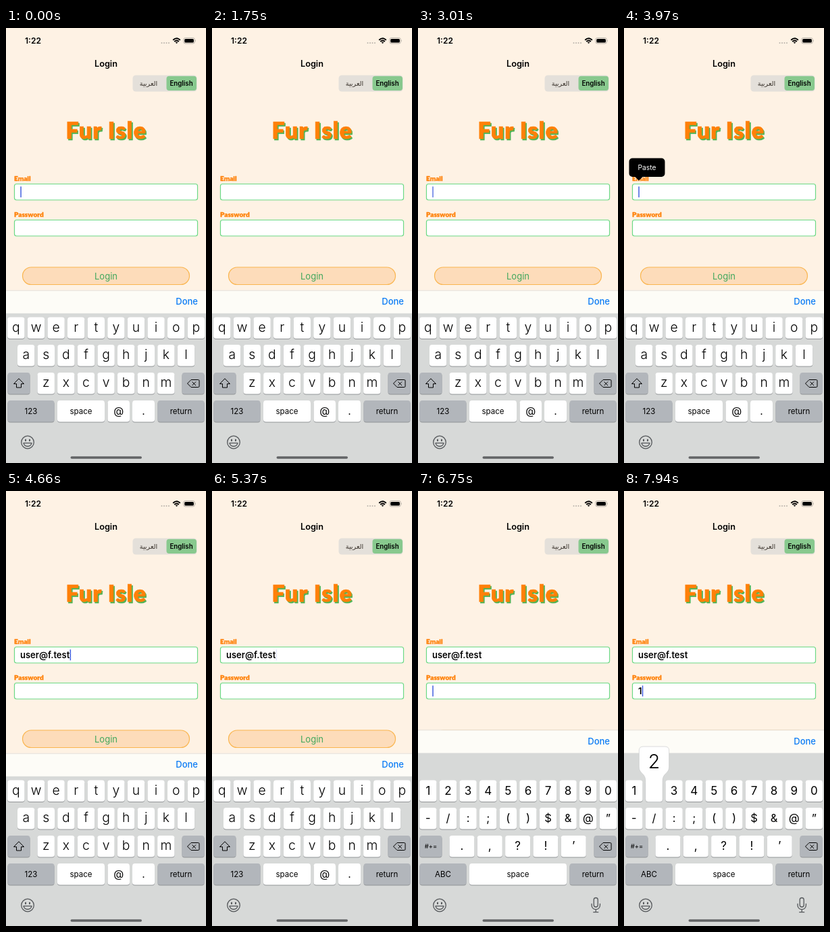
Recreate the animation shown at these times as an HTML page. Size 296 by 640 pixels, loop 8 s.

```html
<!DOCTYPE html>
<html lang="en">
<head>
<meta charset="utf-8">
<title>Login</title>
<style>
html, body { margin: 0; width: 100%; height: 100%; overflow: hidden; background: #fef2e4; }
svg { display: block; width: 100%; height: 100%; font-family: Inter, Roboto, sans-serif; }
.brand { font-family: Lato, "Open Sans", sans-serif; font-weight: 900; }
.mid { text-anchor: middle; }
</style>
</head>
<body>
<svg viewBox="0 0 296 640">
  <rect width="296" height="640" fill="#fef2e4"/>

  <text x="28" y="23" font-size="12" font-weight="600">1:22</text>
  <g fill="#b9b3ac">
    <circle cx="230.5" cy="22" r="1"/><circle cx="234" cy="22" r="1"/>
    <circle cx="237.5" cy="22" r="1"/><circle cx="241" cy="22" r="1"/>
  </g>
  <g fill="none" stroke="#000" stroke-width="1.9">
    <path d="M247.2 17.7Q252.5 12.7 257.8 17.7M249.2 20Q252.5 16.9 255.8 20"/>
    <path d="M250.7 21.2Q252.5 19.7 254.3 21.2L252.5 23Z" fill="#000" stroke="none"/>
  </g>
  <rect x="262.8" y="14.5" width="16.5" height="8.4" rx="2.6" fill="none" stroke="#a8a29b" stroke-width=".8"/>
  <rect x="264.2" y="15.9" width="13.7" height="5.6" rx="1.5"/>
  <path d="M280.3 17.2q1.3 1.5 0 3z" fill="#a8a29b"/>

  <text class="mid" x="148" y="57" font-size="12.7" font-weight="600">Login</text>
  <rect x="187.5" y="69.5" width="95" height="24" rx="4.5" fill="#e4e0da"/>
  <rect x="237.5" y="70.7" width="44.5" height="21.3" rx="4" fill="#88c98e"/>
  <text class="mid" x="211" y="84.5" font-size="9.7" fill="#3a332c" style="font-family:'DejaVu Sans',sans-serif">العربية</text>
  <text class="mid" x="259.5" y="85" font-size="9.7" font-weight="600">English</text>

  <g class="brand mid" font-size="34" letter-spacing="1.2" stroke-width=".7">
    <text x="150" y="164.5" fill="#4fb455" stroke="#4fb455">Fur Isle</text>
    <text x="148.3" y="163.3" fill="#ff8008" stroke="#ff8008">Fur Isle</text>
  </g>
  <g class="brand" font-size="10" fill="#ff8008" stroke="#ff8008" stroke-width=".3">
    <text x="12" y="225">Email</text>
    <text x="12" y="278">Password</text>
  </g>
  <g fill="#fff" stroke="#6bd985" stroke-width="1.2">
    <rect x="12.5" y="229.5" width="271" height="23.5" rx="3"/>
    <rect x="12.5" y="282.5" width="271" height="23.5" rx="3"/>
  </g>
  <g font-size="13" font-weight="600">
    <text id="email" x="21" y="245.5">user@f.test</text>
    <text id="pass" x="21" y="298.5">1</text>
  </g>
  <rect id="caret" width="1.5" height="16" fill="#4361e0"/>

  <rect x="24.5" y="352" width="247" height="25.5" rx="12.7" fill="#fddcba" stroke="#fab650" stroke-width="1.2"/>
  <text class="mid" x="148" y="369.5" font-size="13" fill="#3fa75c">Login</text>

  <g id="menu">
    <path d="M12.5 191.5h43a5 5 0 0 1 5 5v17.5a5 5 0 0 1-5 5h-28l-5.5 5.500-5.500-5.500h-4a5 5 0 0 1-5-5v-17.500a5 5 0 0 1 5-5z"/>
    <text class="mid" x="34" y="209" font-size="10.3" fill="#fff">Paste</text>
  </g>

  <g id="bar">
    <rect width="296" height="34.5" fill="#fdfcf7"/>
    <rect width="296" height=".7" fill="#d9d3cb"/>
    <text x="284" y="21.7" text-anchor="end" font-size="13" font-weight="500" fill="#0a7bf5">Done</text>
  </g>
  <rect id="tray" width="296" height="260" fill="#d7d9d8"/>
  <g id="mailKeys"></g>
  <g id="passKeys"></g>
  <g id="numKeys"></g>

  <g fill="none" stroke="#55585b" stroke-width="1.3" stroke-linecap="round" stroke-linejoin="round">
    <circle cx="32" cy="609.5" r="9.3"/>
    <path d="M26 610.7h12q-1.200 4.800-6 4.800t-6-4.800z"/>
    <path d="M29 605.8v1.500M35 605.800v1.500" stroke-width="2"/>
    <g id="mic">
      <rect x="260.2" y="598.5" width="6" height="13.5" rx="3"/>
      <path d="M257 607.5v2a6.200 6.200 0 0 0 12.400 0v-2M263.200 616v3.500M259.700 619.700h7"/>
    </g>
  </g>
  <rect x="95.5" y="630.3" width="105.5" height="3.4" rx="1.7" fill="#626466"/>
  <g id="popup">
    <path id="bulb" fill="#fff" stroke="#c3c5c6" stroke-width=".6"/>
    <text id="digit" class="mid" y="408" font-size="28.5" font-weight="300"></text>
  </g>
</svg>
<script>
const $ = id => document.getElementById(id);
const LOOP = 8000, PITCH = 29.6, KEY_H = 31.5;
const ROWS = [425.5, 466, 507, 548];

function key(x, row, w, label, size, { grey = false, weight = 400, lift = 0 } = {}) {
  const y = ROWS[row];
  const box = (dy, fill) =>
    `<rect x="${x}" y="${y + dy}" width="${w}" height="${KEY_H}" rx="3.8" fill="${fill}"/>`;
  const text = label.replace("&", "&amp;");
  return box(1, "#929597") + box(0, grey ? "#b2b6bb" : "#fff") +
    `<text class="mid" x="${x + w / 2}" y="${y + 15.5 + size * .35 - lift}" font-size="${size}" font-weight="${weight}">${text}</text>`;
}

const run = (chars, x, row, size, { w = 25.4, pitch = PITCH, ...look } = {}) =>
  [...chars].map((c, i) => key(x + i * pitch, row, w, c, size, look)).join("");

const GREY = { grey: true };

const eraser = () => key(260.5, 2, 33, "", 10, GREY) +
  `<path d="M274 517.5h10.5q1.5 0 1.5 1.5v8q0 1.5-1.5 1.5h-10.5l-5.500-5.500zM275.500 520.500l5.500 5.500m0-5.500l-5.500 5.500"
    fill="none" stroke="#000" stroke-width="1" stroke-linejoin="round"/>`;

const shift = () => key(2.5, 2, 33, "", 10, GREY) +
  `<path d="M19 515.8l7.5 7.700h-4v5.500h-7v-5.500h-4z"
    fill="none" stroke="#000" stroke-width="1" stroke-linejoin="round"/>`;

const LETTER = { weight: 300, lift: 1.2 };
const letters = () => run("qwertyuiop", 2.2, 0, 19.3, LETTER) + run("asdfghjkl", 17, 1, 19.3, LETTER) +
  shift() + run("zxcvbnm", 46.5, 2, 19.3, LETTER) + eraser();

const ends = mode => key(2.5, 3, 69, mode, 11.5, { grey: true, lift: -.8 }) +
  key(224.5, 3, 69, "return", 11.5, GREY);
const wideSpace = () => key(76, 3, 144, "space", 11.5);

$("mailKeys").innerHTML = letters() + ends("123") + key(76, 3, 70, "space", 11.5) +
  key(150.5, 3, 32.5, "@", 15.5) + key(187, 3, 33, ".", 15.5);
$("passKeys").innerHTML = letters() + ends("123") + wideSpace();
$("numKeys").innerHTML = run("1234567890", 2.2, 0, 17) + run("-/:;()$&@”", 2.2, 1, 16.5) +
  key(2.5, 2, 33, "#+=", 9.5, GREY) + run(".,?!’", 46.5, 2, 17, { w: 37, pitch: 41.3 }) +
  eraser() + ends("ABC") + wideSpace();

// Flat [time, value] pairs; the last one reached holds.
function hold(steps, t) {
  let value = steps[0][1];
  for (const [at, v] of steps) if (t >= at) value = v;
  return value;
}

const caretSteps = [
  [0, 1], [380, .7], [500, 0], [860, 1], [1400, .7], [1510, 0], [1860, 1],
  [2400, .7], [2520, 0], [2630, 1], [3010, .85], [3130, 0], [3490, 1],
  [4090, .7], [4210, 0], [4530, 1], [5250, .6], [5370, .15], [5560, 1],
  [6060, .7], [6170, 0], [6520, 1], [7300, .7], [7410, 0], [7590, 1]
];
const menuSteps = [[0, 0], [3750, .5], [3860, 1], [4530, .5], [4650, 0]];
const pressSteps = [[0, 0], [7590, 1], [7820, 0], [7940, 2]];
const PASTE = 4650, NEXT_FIELD = 5560, NUMBERS = 6750, TYPED = 7700;

const show = (id, on) => $(id).setAttribute("visibility", on ? "visible" : "hidden");

function drawPopup(n) {
  show("popup", n > 0);
  if (!n) return;
  const k = 2.2 + (n - 1) * PITCH, r = k + 25.4;
  const left = Math.max(2, k - 9.5), right = r + 9.5;
  $("bulb").setAttribute("d",
    `M${left + 6} 376H${right - 6}q6 0 6 6v24c0 10 ${r - right} 9 ${r - right} 20V453.5q0 4-4 4` +
    `H${k + 4}q-4 0-4-4V426c0-11 ${left - k}-10 ${left - k}-20V382q0-6 6-6z`);
  $("digit").textContent = n;
  $("digit").setAttribute("x", (left + right) / 2);
}

function render(t) {
  const second = t >= NEXT_FIELD, pasted = t >= PASTE, typed = t >= TYPED;
  show("email", pasted);
  show("pass", typed);

  const field = second ? $("pass") : $("email");
  const filled = second ? typed : pasted;
  $("caret").setAttribute("x", filled ? 21.3 + field.getComputedTextLength() : 21.3);
  $("caret").setAttribute("y", second ? 286.3 : 233.2);
  $("caret").setAttribute("opacity", hold(caretSteps, t));
  $("menu").setAttribute("opacity", hold(menuSteps, t));

  $("bar").setAttribute("transform", `translate(0 ${second ? 351.5 : 385.8})`);
  $("tray").setAttribute("y", second ? 385.5 : 419.8);
  show("mailKeys", !second);
  show("passKeys", second && t < NUMBERS);
  show("numKeys", t >= NUMBERS);
  show("mic", second);
  drawPopup(hold(pressSteps, t));
}

const start = performance.now();
function tick() {
  render((performance.now() - start) % LOOP);
  requestAnimationFrame(tick);
}
tick();
</script>
</body>
</html>
```
